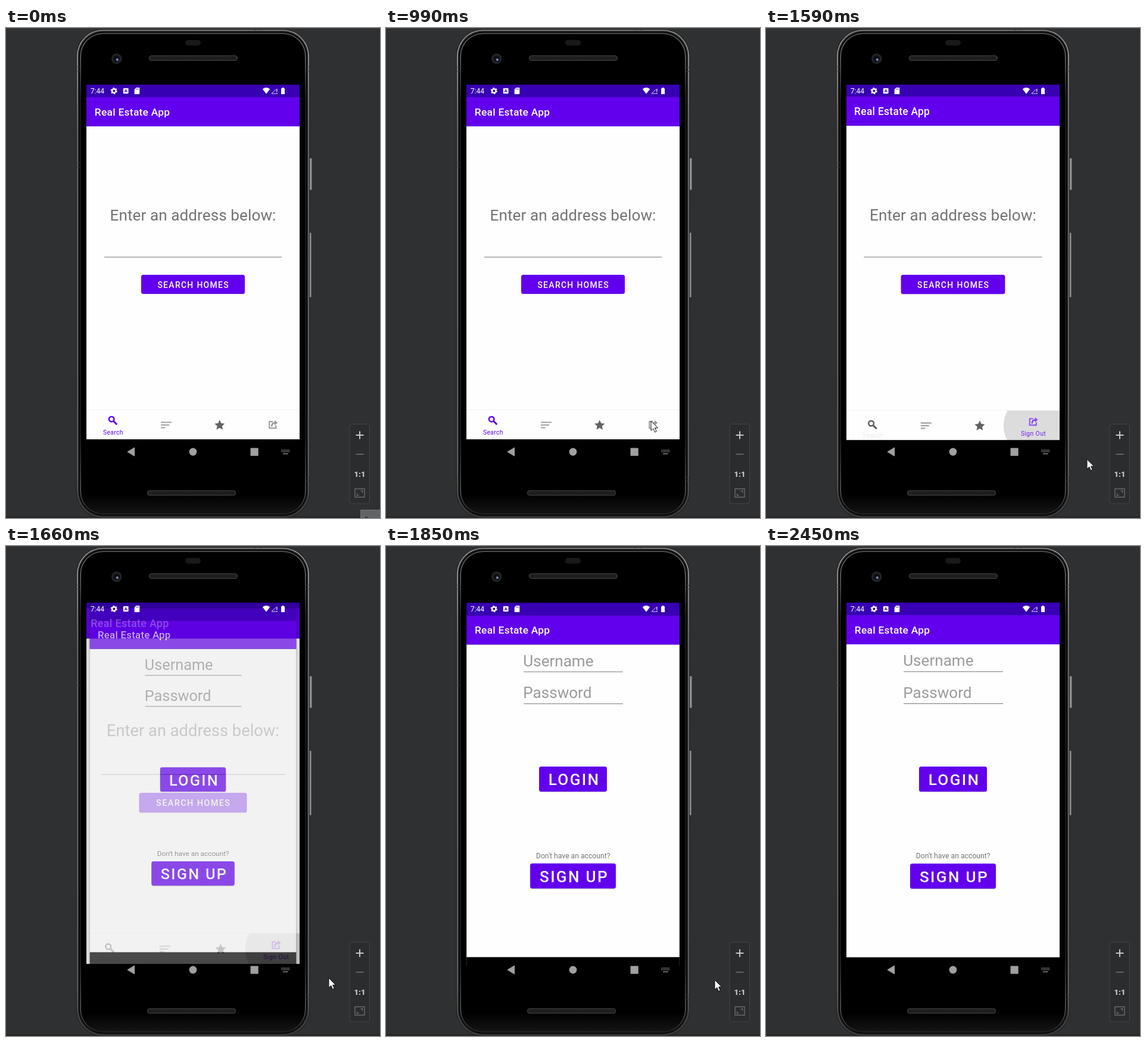
These frames come from a looping animation (628x822 px, 2850 ms). An HTML page:

```html
<!DOCTYPE html>
<html lang="en">
<head>
<meta charset="utf-8">
<title>Real Estate App</title>
<style>
html, body { margin: 0; width: 100%; height: 100%; overflow: hidden; background: #2e3032; }
svg { display: block; width: 100vw; height: 100vh; font-family: Roboto, sans-serif; }
.mid { text-anchor: middle; }
.btn { font-weight: 500; fill: #fff; }
</style>
</head>
<body>
<svg viewBox="0 0 628 822" xmlns="http://www.w3.org/2000/svg">
<defs>
  <linearGradient id="rim" x1="0" y1="0" x2="0" y2="1">
    <stop offset="0" stop-color="#8c8c8c"/><stop offset=".06" stop-color="#a0a0a0"/>
    <stop offset=".2" stop-color="#747474"/><stop offset=".9" stop-color="#686868"/>
    <stop offset="1" stop-color="#3c3c3c"/>
  </linearGradient>
  <linearGradient id="edge" x1="0" y1="0" x2="0" y2="1">
    <stop offset="0" stop-color="#5c5c5c"/><stop offset=".05" stop-color="#6c6c6c"/>
    <stop offset=".14" stop-color="#1c1c1c"/><stop offset=".84" stop-color="#1c1c1c"/>
    <stop offset=".95" stop-color="#5a5a5a"/><stop offset="1" stop-color="#262626"/>
  </linearGradient>
  <linearGradient id="glass" x1="0" y1="0" x2="0" y2="1">
    <stop offset="0" stop-color="#000"/><stop offset=".96" stop-color="#000"/><stop offset="1" stop-color="#141414"/>
  </linearGradient>
  <linearGradient id="key" x1="0" y1="0" x2="1" y2="0">
    <stop offset="0" stop-color="#2a2a2a"/><stop offset=".6" stop-color="#9a9a9a"/><stop offset="1" stop-color="#555"/>
  </linearGradient>
  <radialGradient id="ink">
    <stop offset="0" stop-color="#000"/><stop id="inkEdge" offset=".4" stop-color="#000"/>
    <stop offset="1" stop-color="#000" stop-opacity="0"/>
  </radialGradient>
  <pattern id="mesh" width="4" height="4" patternUnits="userSpaceOnUse">
    <path d="M0 0L2 2L0 4M2 0L4 2L2 4" fill="none" stroke="#4c4c4c" stroke-width=".8"/>
  </pattern>
  <clipPath id="screen"><rect x="135" y="95" width="358" height="636"/></clipPath>
  <clipPath id="tabs"><rect x="135" y="641" width="358" height="49"/></clipPath>
  <g id="bar">
    <rect x="135" y="95" width="358" height="21" fill="#3700b3"/>
    <rect x="135" y="116" width="358" height="49" fill="#6200ee"/>
    <text x="148.800" y="147" font-size="17.4" font-weight="500" letter-spacing=".26" fill="#fff">Real Estate App</text>
  </g>
</defs>

<rect width="628" height="822" fill="#2e3032"/>
<rect width="628" height="1.5" fill="#3d3e40"/>
<rect y="819" width="628" height="3" fill="#292829"/>

<!-- phone body -->
<g>
  <rect x="507" y="218" width="7.5" height="54" rx="1.5" fill="url(#key)" stroke="#222" stroke-width=".7"/>
  <rect x="506" y="343" width="7.5" height="109" rx="1.5" fill="url(#key)" stroke="#222" stroke-width=".7"/>
  <g id="shell"></g>
  <path d="M118 66h5.500M118 72.500h5.500M504.500 66h5M504.500 72.500h5M118 227h5.500M118 233.500h5.500M504.500 754h5M504.500 760h5M418 2.500v4M428.500 2.500v4" stroke="#3a3a3a" stroke-width="1"/>
  <rect x="301" y="20" width="26" height="9.500" rx="4.700" fill="#191919"/>
  <circle cx="185.700" cy="51.500" r="8.700" fill="#222325"/>
  <circle cx="185.700" cy="51.500" r="5.300" fill="#0d0f16"/>
  <circle cx="186.800" cy="53" r="2.300" fill="#59618c"/>
  <circle cx="187" cy="53.500" r="1.100" fill="#bcc3dd"/>
  <g fill="url(#mesh)" stroke="#444" stroke-width="1">
    <rect x="240.500" y="46.500" width="148" height="8" rx="3.500"/>
    <rect x="237.500" y="776" width="148" height="8" rx="3.500"/>
  </g>
</g>

<g clip-path="url(#screen)">
  <rect x="135" y="95" width="358" height="21" fill="#3700b3"/>
  <g id="home">
    <rect x="135" y="95" width="358" height="636"/>
    <rect x="135" y="165" width="358" height="525" fill="#fefefe"/>
    <use href="#bar"/>
    <text class="mid" x="314" y="323" font-size="26.1" letter-spacing=".08" fill="#737373">Enter an address below:</text>
    <path d="M165 384.300H463" stroke="#777" stroke-width="1"/>
    <rect x="227" y="415" width="174" height="32" rx="3.500" opacity=".1"/>
    <rect x="227" y="414" width="174" height="32" rx="3.500" fill="#6200ee"/>
    <text class="mid btn" x="314.700" y="435.500" font-size="13.900" letter-spacing="1.350">SEARCH HOMES</text>
    <rect x="135" y="640" width="358" height="1" fill="#f0f0f0"/>
    <g clip-path="url(#tabs)"><circle id="ripple" fill="url(#ink)"/></g>
    <g id="tabA">
      <circle cx="177.200" cy="656.200" r="4.300" fill="none" stroke="currentColor" stroke-width="2.500"/>
      <path d="M180.300 659.300L186.300 665.300" stroke="currentColor" stroke-width="3"/>
    </g>
    <text id="labelA" class="mid" x="179.900" font-size="10.400" letter-spacing=".350">Search</text>
    <path d="M260 661.500H278M260 666H274M260 670.500H267.500" stroke="#a2a2a2" stroke-width="2.200"/>
    <path id="star" fill="#636363"/>
    <g id="tabB" fill="none" stroke="currentColor" stroke-width="1.900" opacity=".65">
      <path d="M448 660.300H442.200V671.200H453.200V666.500"/>
      <path d="M446 668.500C446.200 664 448.500 662.300 452 662.300" stroke-width="2.600"/>
      <path d="M451 658L456 662.200L451 666.400Z" fill="currentColor" stroke="none"/>
    </g>
    <text id="labelB" class="mid" x="448.400" y="682.500" font-size="10.400" letter-spacing=".350" fill="#6200ee">Sign Out</text>
    <rect id="dim" x="135" y="95" width="358" height="636"/>
  </g>
  <g id="login">
    <rect x="135" y="95" width="358" height="636"/>
    <rect x="135" y="165" width="358" height="525" fill="#fefefe"/>
    <use href="#bar"/>
    <g font-size="26.1" fill="#9b9b9b">
      <text x="230.200" y="201.300">Username</text>
      <text x="230.200" y="255">Password</text>
    </g>
    <path d="M231 210.800H398M231 264.500H398" stroke="#787878" stroke-width="1"/>
    <g opacity=".18">
      <rect x="257" y="371.300" width="114" height="42" rx="3.500"/>
      <rect x="242" y="534" width="144" height="42" rx="3.500"/>
    </g>
    <g fill="#6200ee">
      <rect x="257" y="370" width="114" height="42" rx="3.500"/>
      <rect x="242" y="532.700" width="144" height="42" rx="3.500"/>
    </g>
    <g class="btn mid" font-size="26.1" letter-spacing="2.330">
      <text x="316" y="401.300">LOGIN</text>
      <text x="316" y="564">SIGN UP</text>
    </g>
    <text class="mid" x="314.200" y="523.800" font-size="12.200" fill="#757575">Don't have an account?</text>
  </g>
</g>

<!-- status bar -->
<g fill="#fff">
  <text x="141.700" y="110" font-size="12.200">7:44</text>
  <circle cx="181.300" cy="105.500" r="3.200" fill="none" stroke="#fff" stroke-width="2.400"/>
  <circle cx="181.300" cy="105.500" r="4.700" fill="none" stroke="#fff" stroke-width="1.800" stroke-dasharray="2.460"/>
  <rect x="196.800" y="101" width="8.800" height="9" rx="1"/>
  <text class="mid" x="201.200" y="108.300" font-size="7.500" font-weight="700" style="fill:#3700b3">A</text>
  <path d="M218.500 100H223.500Q224.300 100 224.300 100.800V110.200Q224.300 111 223.500 111H216.500Q215.700 111 215.700 110.200V103Z"/>
  <path d="M218.800 101.500v2M220.600 101.500v2M222.400 101.500v2" stroke="#3700b3" stroke-width=".8"/>
  <path d="M430.800 102.500Q437 97.600 443.200 102.500L437 110.500Z"/>
  <path d="M446 110H455.300V101Z" fill="none" stroke="#d9d0f0" stroke-width="1"/>
  <path d="M454.800 100.500v9" stroke="#3700b3" stroke-width="3"/>
  <path d="M454.800 102v5.300M454.800 108.700v1.500" stroke="#fff" stroke-width="1.200"/>
  <path d="M462 101.200H463.700V100H466.300V101.200H468V111H462Z"/>
</g>

<!-- system navigation -->
<g fill="#a0a0a0">
  <path d="M204 711L215.700 704V718Z" stroke="#a0a0a0" stroke-width="1" stroke-linejoin="round"/>
  <circle cx="314" cy="711" r="6.400"/>
  <rect x="410.500" y="704.500" width="13.200" height="13.200" rx="1"/>
  <path d="M462.500 708.300H476M462.500 710.700H476" stroke="#8c8c8c" stroke-width="1.400" stroke-dasharray="1.500 .9"/>
  <path d="M465 714.300H473.500" stroke="#8c8c8c" stroke-width="1.500"/>
</g>

<!-- zoom panel -->
<rect x="577" y="664.500" width="33.500" height="133.500" rx="3.500" fill="#2b2c2d" stroke="#424446"/>
<path d="M587.500 683H600.500M594 676.500V689.500" stroke="#c6c6c6" stroke-width="2"/>
<path d="M587.500 715H600.500" stroke="#606163" stroke-width="2"/>
<text class="mid" x="594" y="752.500" font-size="13" font-weight="900" fill="#c6c6c6">1:1</text>
<g fill="none" stroke="#66686a" stroke-width="1.500">
  <rect x="586" y="773" width="16" height="14"/>
  <path d="M589.500 781V784H592.500M595.500 776.500H598.500V779.500"/>
</g>

<g id="tip">
  <rect x="595.500" y="808.500" width="34" height="16" fill="#626466" stroke="#6e7072"/>
  <text x="602" y="828.500" font-size="12" fill="#222">D</text>
</g>
<path id="cursor" d="M0 0V16.200L3.800 12.700L6.500 18.800L9.200 17.600L6.500 11.700H11.600Z" fill="#fff" stroke="#000" stroke-width=".9"/>
</svg>

<script>
const $ = id => document.getElementById(id);
const LOOP = 2850, STEP = 66.2, LAST = 37;
const clamp = x => Math.min(1, Math.max(0, x));
const mix = (a, b, p) => a + (b - a) * p;
const ramp = (t, from, to) => clamp((t - from) / (to - from));
const easeOut = p => 1 - (1 - p) ** 2;
const smooth = p => p * p * (3 - 2 * p);
const set = (id, attrs) => { for (const k in attrs) $(id).setAttribute(k, attrs[k]); };

// pointer legs: step, x, y, easing towards that place
const path = [
  [2, 607, 806], [9, 476, 689, easeOut], [13, 438, 654.5, smooth], [17, 452, 664, smooth],
  [18, 452, 664], [20, 508, 700], [24, 539, 723.5, easeOut], [26, 545, 726],
  [28, 552, 728], [35, 597, 802, smooth], [36, 600, 815]
];

function pointer(k) {
  if (k < path[0][0] || k > path[path.length - 1][0]) return null;
  const i = Math.max(1, path.findIndex(q => q[0] >= k));
  const [k0, x0, y0] = path[i - 1], [k1, x1, y1, ease] = path[i];
  const p = (k - k0) / (k1 - k0), e = ease ? ease(p) : p;
  return [mix(x0, x1, e), mix(y0, y1, e)];
}

const cubic = (a, b, c, d, u) =>
  a * (1 - u) ** 3 + 3 * b * u * (1 - u) ** 2 + 3 * c * u * u * (1 - u) + d * u ** 3;

// window easing: quick start, very long settle
function settle(x) {
  const [X, Y] = x < 1 / 6
    ? [[0, .05, .1333, 1 / 6], [0, 0, .06, .4]]
    : [[1 / 6, .2083, .25, 1], [.4, .82, 1, 1]];
  let lo = 0, hi = 1;
  for (let i = 0; i < 24; i++) {
    const u = (lo + hi) / 2;
    if (cubic(...X, u) < x) lo = u; else hi = u;
  }
  return cubic(...Y, lo);
}

const zoom = s => `translate(314 413) scale(${s}) translate(-314 -413)`;

// nested rounded layers of the phone, from the outside in
function shell() {
  const layer = (inset, fill) =>
    `<rect x="${118 + inset}" y="${2 + inset}" width="${392 - 2 * inset}" height="${820.5 - 2 * inset}" rx="${45 - inset}" fill="${fill}"/>`;
  return layer(0, '#1d1d1d') + layer(1, 'url(#rim)') + layer(2.6, '#303030') +
    layer(4, '#0c0c0c') + layer(6.5, 'url(#edge)') + layer(8, 'url(#glass)');
}

function star(cx, cy, r) {
  const pts = [];
  for (let i = 0; i < 10; i++) {
    const a = i * Math.PI / 5, d = i % 2 ? r * .48 : r;
    pts.push((cx + d * Math.sin(a)).toFixed(2) + ' ' + (cy - d * Math.cos(a)).toFixed(2));
  }
  return 'M' + pts.join('L') + 'Z';
}

function draw(ms) {
  const k = Math.min(LAST, Math.floor((ms + 6) / STEP)), t = k * STEP;

  $('tip').style.display = k === 0 ? '' : 'none';
  const at = pointer(k);
  $('cursor').style.display = at ? '' : 'none';
  if (at) set('cursor', { transform: `translate(${at[0]} ${at[1]})` });

  const grow = ramp(t, 1200, 1530);
  set('ripple', {
    cx: mix(452, 449, grow), cy: 666,
    r: mix(16, 51, grow),
    opacity: t < 1240 ? 0 : mix(.24, .135, grow)
  });
  set('inkEdge', { offset: mix(.05, .98, Math.sqrt(grow) * grow) });

  const picked = k >= 20, move = smooth(ramp(t, 1390, 1560));
  set('tabA', { color: picked ? '#5f5f5f' : '#6200ee', transform: `translate(0 ${6 * move})` });
  set('labelA', { fill: picked ? '#666' : '#6200ee', opacity: mix(1, .13, move), y: mix(681.7, 686, move) });
  set('tabB', { color: picked ? '#6200ee' : '#5f5f5f', transform: `translate(0 ${-6 * move})` });
  set('labelB', { opacity: move * .85 });

  const p = settle(ramp(t, 1550, 1950));
  set('home', { transform: zoom(mix(1, 1.05, p)) });
  set('dim', { opacity: ramp(t, 1600, 1720) * .3 });
  set('login', { transform: zoom(mix(.85, 1, p)), opacity: ramp(t, 1600, 1683) });
}

$('shell').innerHTML = shell();
set('star', { d: star(358.7, 666.5, 9) });
const start = performance.now();
function tick() {
  draw((performance.now() - start) % LOOP);
  requestAnimationFrame(tick);
}
tick();
</script>
</body>
</html>
```
